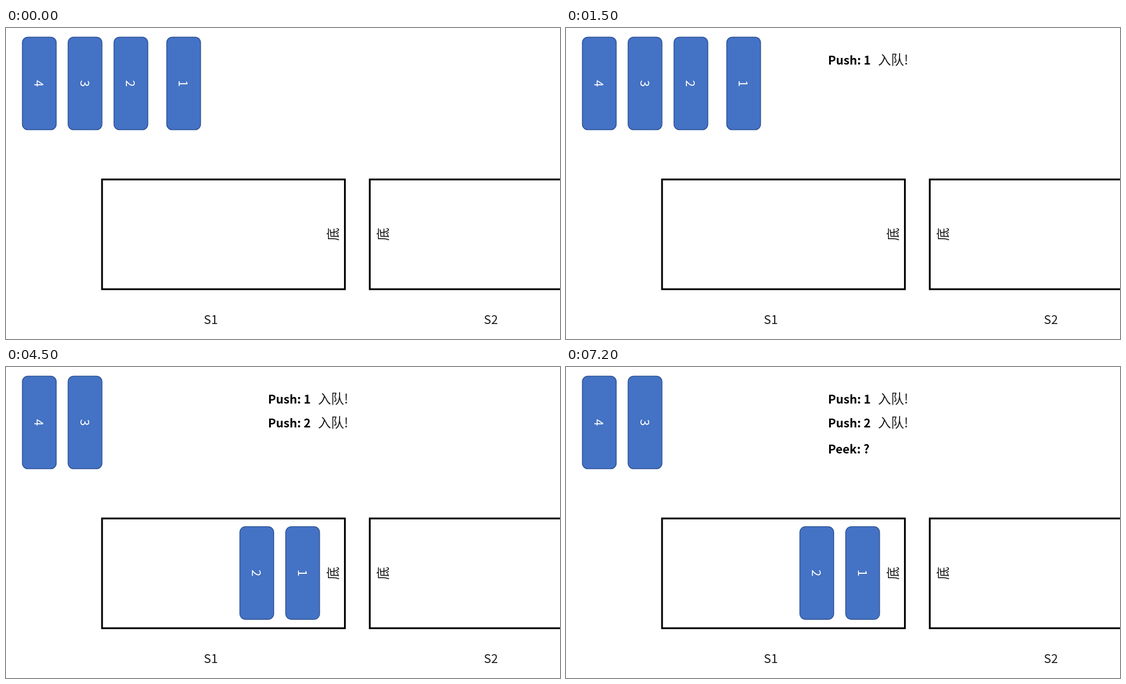
Recreate the animation shown at these times as an HTML page. Size 998x561 px, loop 8 s.

```html
<!DOCTYPE html>
<html lang="zh-CN">
<head>
<meta charset="utf-8">
<title>Queue from two stacks</title>
<style>
  html, body { margin: 0; width: 100%; height: 100%; overflow: hidden; background: #fff; }
  svg { display: block; }
  text { font: 22px "Noto Sans CJK SC", "Noto Sans CJK", sans-serif; fill: #1c1c1c; }
  .stack { fill: none; stroke: #000; stroke-width: 3.2; }
  .block rect { fill: #4472c4; stroke: #2f5597; stroke-width: 1.5; }
  .block text { font-weight: 300; fill: #fff; text-anchor: middle; }
  .label { text-anchor: middle; }
  .bottom { font-size: 23.5px; text-anchor: middle; }
  .command { font-size: 21.5px; font-weight: 700; fill: #000; }
  .note { font-size: 23.5px; font-weight: 300; }
</style>
</head>
<body>
<svg width="998" height="561" viewBox="0 0 998 561">
  <rect class="stack" x="173" y="273.2" width="437.5" height="198"/>
  <rect class="stack" x="655.3" y="273.2" width="437.5" height="198"/>
  <text class="bottom" transform="translate(589 372) rotate(-90)" y="9">底</text>
  <text class="bottom" transform="translate(679 372) rotate(-90)" y="9">底</text>
  <text class="label" x="369" y="534">S1</text>
  <text class="label" x="873.5" y="534">S2</text>
  <g id="blocks"></g>
  <g id="log"></g>
</svg>
<script>
const LOOP = 8000;
const WAIT_Y = 100, STACK_Y = 371.7;

// Each block waits at waitX; those with a push time then jump into S1.
const blocks = [
  { name: 4, waitX: 60 },
  { name: 3, waitX: 142.4 },
  { name: 2, waitX: 225, pushAt: 4500, stackX: 451.8 },
  { name: 1, waitX: 320, pushAt: 3000, stackX: 534.4 },
];
const messages = [
  { at: 1500, y: 66, command: 'Push: 1', note: '入队!' },
  { at: 4500, y: 109.3, command: 'Push: 2', note: '入队!' },
  { at: 6000, y: 155.5, command: 'Peek: ?', note: '' },
];

function addGroup(parentId, className, markup) {
  const group = document.createElementNS('http://www.w3.org/2000/svg', 'g');
  group.setAttribute('class', className);
  group.innerHTML = markup;
  document.getElementById(parentId).append(group);
  return group;
}

for (const block of blocks) {
  block.node = addGroup('blocks', 'block',
    `<rect x="-30.5" y="-83.6" width="61" height="167.2" rx="10.2"/>
     <text transform="rotate(90)" y="8.6">${block.name}</text>`);
}
for (const message of messages) {
  message.node = addGroup('log', 'message',
    `<text class="command" x="472" y="${message.y}">${message.command}</text>
     <text class="note" x="562" y="${message.y}">${message.note}</text>`);
}

function draw(time) {
  for (const { node, waitX, pushAt, stackX } of blocks) {
    const pushed = time >= pushAt;
    node.setAttribute('transform',
      `translate(${pushed ? stackX : waitX} ${pushed ? STACK_Y : WAIT_Y})`);
  }
  for (const { node, at } of messages) {
    node.setAttribute('visibility', time >= at ? 'visible' : 'hidden');
  }
}

const start = performance.now();
function tick() {
  draw((performance.now() - start) % LOOP);
  requestAnimationFrame(tick);
}
tick();
</script>
</body>
</html>
```
